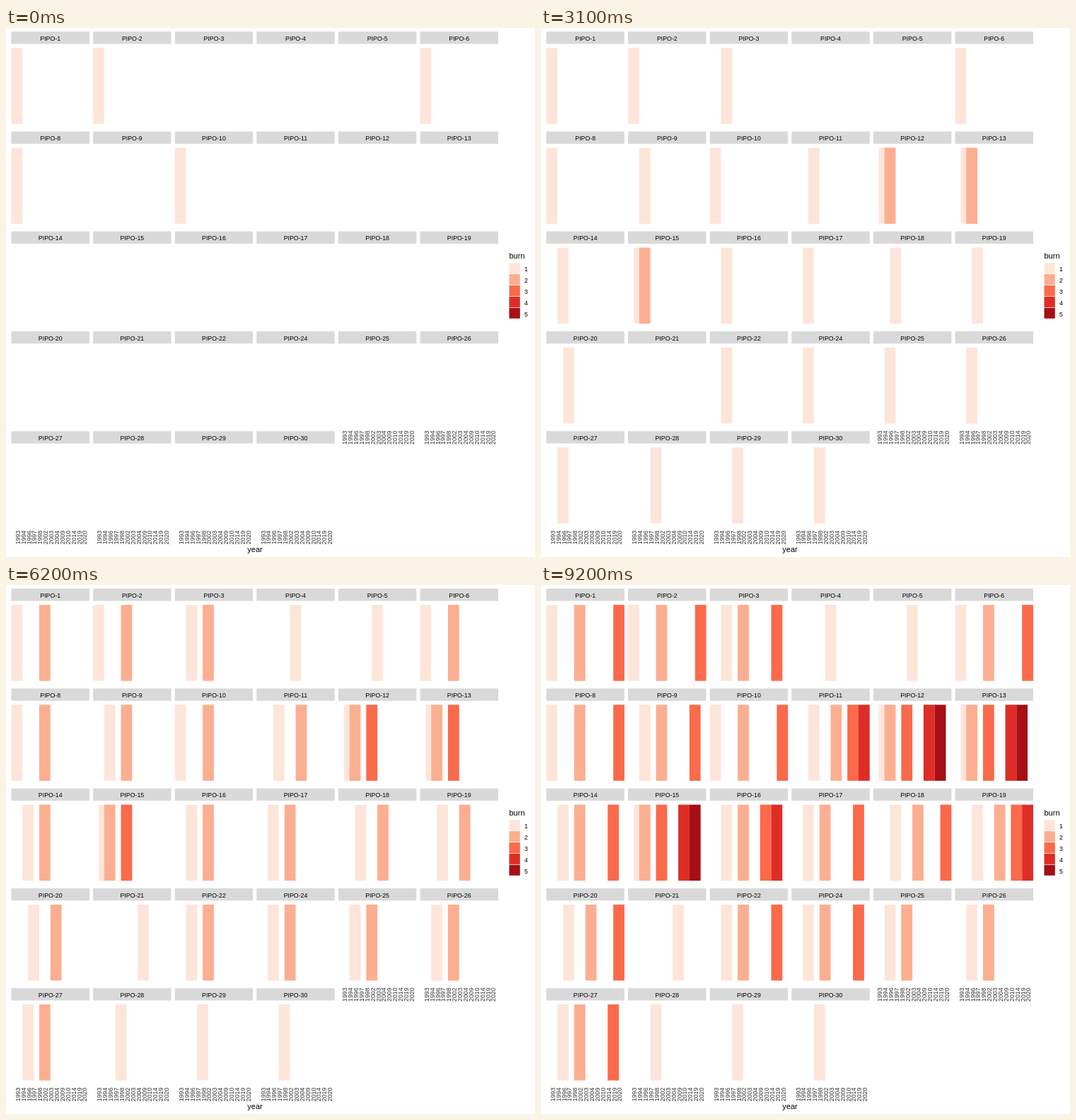
An HTML page that plays this animation: 748x748 px, repeating every 10000 ms.

```html
<!DOCTYPE html>
<html lang="en">
<head>
<meta charset="utf-8">
<title>Burns by plot and year</title>
<style>
  html, body { margin: 0; width: 100%; height: 100%; overflow: hidden; background: #fff; }
  svg { display: block; width: 748px; height: 748px; }
  text { font: 8.8px "Liberation Sans", Arial, sans-serif; fill: #000; }
  .axis { fill: #333; }
  .title { font-size: 11px; }
  .mid { text-anchor: middle; }
</style>
</head>
<body>
<svg id="chart" viewBox="0 0 748 748"></svg>
<script>
const YEARS = '1993 1994 1996 1997 1998 2002 2003 2004 2009 2010 2014 2019 2020'.split(' ');
const REDS = ['#fee5d9', '#fcae91', '#fb6a4a', '#de2d26', '#a50f15'];

// Burn years of each treatment, as hex indices into YEARS.
const BURNS = {
  A: '05c', B: '25b', C: '6', D: '37ac', E: '1259b',
  F: '259b', G: '37c', H: '8', I: '25', J: '4'
};
// Treatment of each plot, one row of panels per word.
const ROWS = 'AABCCA ABADEE BEFBGD GHBBII BJJJ'.split(' ');
const MISSING = [7, 23];

// Each year holds 800 ms, a few hold 700 ms.
const LOOP = 10000, SHORT = [0, 6, 10, 11];
const startOf = k => 800 * k - 100 * SHORT.filter(s => s < k).length;

const LEFT = 7.5, COL_STEP = 115.6, ROW_STEP = 141.25, UNIT = 7.89;
const chart = document.getElementById('chart');

function add(tag, attrs, content = '') {
  const el = document.createElementNS('http://www.w3.org/2000/svg', tag);
  for (const name in attrs) el.setAttribute(name, attrs[name]);
  el.textContent = content;
  return chart.appendChild(el);
}

const box = (x, y, width, height, fill) => add('rect', { x, y, width, height, fill });
const label = (x, y, content, cls = '') => add('text', { x, y, class: cls }, content);

function appearAt(el, time) {
  if (!time) return;
  el.animate([
    { visibility: 'hidden', easing: 'step-end' },
    { visibility: 'visible', offset: time / LOOP, easing: 'step-end' },
    { visibility: 'visible' }
  ], { duration: LOOP, iterations: Infinity });
}

function yearAxis(x, y) {
  YEARS.forEach((year, k) => {
    const tx = x + (k + 1) * UNIT + 4.4;
    add('text', { transform: `translate(${tx} ${y}) rotate(-90)`, class: 'axis mid' }, year);
  });
}

function panel(x, y, id, burns) {
  box(x, y + 5.1, 14 * UNIT, 17.4, '#d9d9d9');
  label(x + 7 * UNIT, y + 17.9, 'PIPO-' + id, 'mid');
  [...burns].forEach((digit, level) => {
    const k = parseInt(digit, 16);
    appearAt(box(x + k * UNIT, y + 28.1, 2 * UNIT, 107.5, REDS[level]), startOf(k));
  });
}

let id = 0;
ROWS.forEach((row, r) => [...row].forEach((kind, c) => {
  do id++; while (MISSING.includes(id));
  const x = LEFT + c * COL_STEP, y = r * ROW_STEP;
  panel(x, y, id, BURNS[kind]);
  if (!ROWS[r + 1]?.[c]) yearAxis(x, y + 155.4);
}));

label(352, 741, 'year', 'title mid');
label(711.5, 326.4, 'burn', 'title');
REDS.forEach((fill, i) => {
  const y = 332.3 + i * 15.84;
  box(711.5, y, 15.3, 15.1, fill);
  label(733, y + 12, i + 1);
});
</script>
</body>
</html>
```
